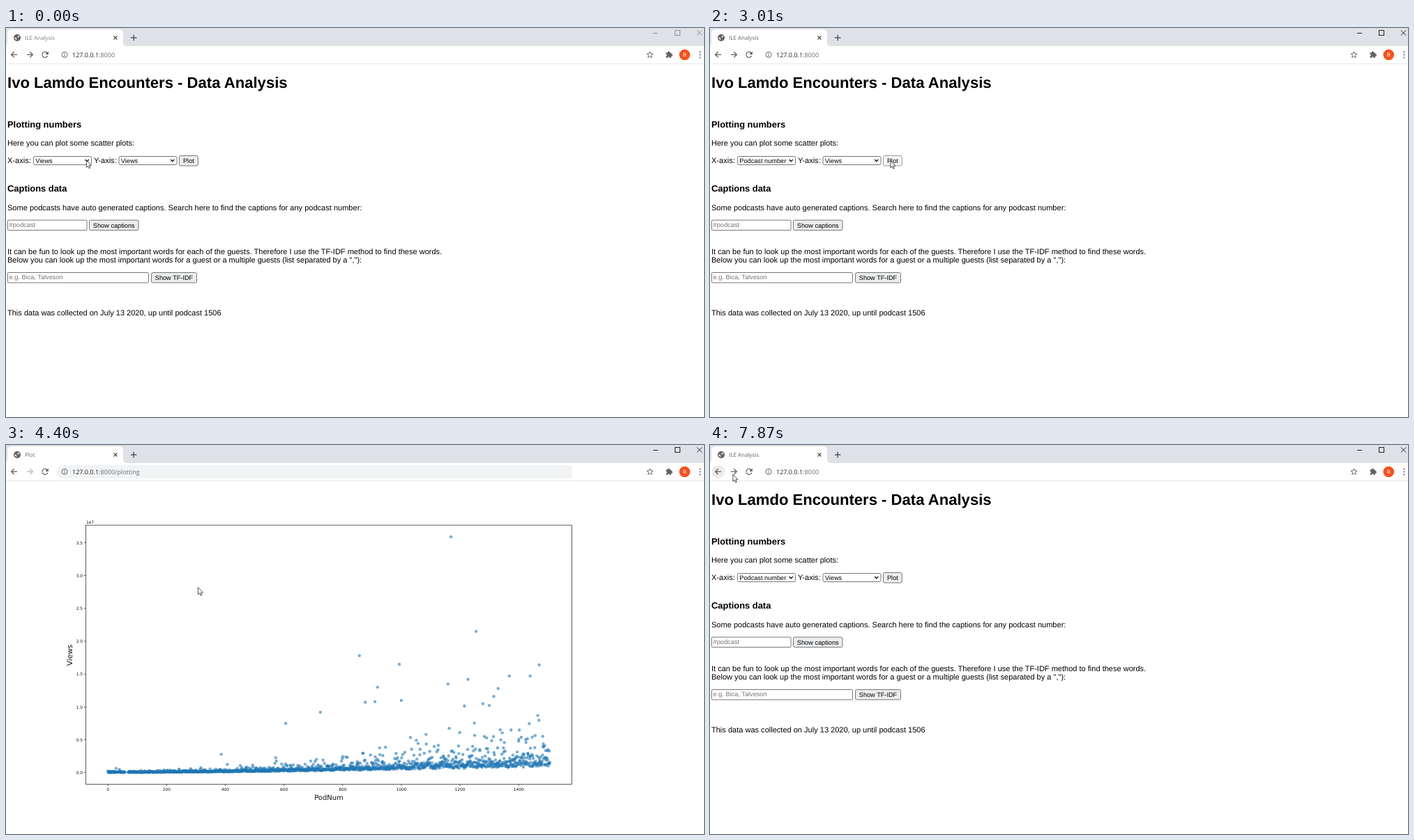
An HTML page with a canvas for the animation above (7.99 s loop, 1001 px wide and 559 px high).

```html
<!DOCTYPE html>
<html lang="en">
<head>
<meta charset="utf-8">
<title>Data Analysis</title>
<style>
html, body { margin: 0; width: 100%; height: 100%; overflow: hidden; background: #fff; }
canvas { display: block; }
</style>
</head>
<body>
<canvas id="stage" width="1001" height="559"></canvas>
<script>
const LOOP = 7990;
const STEP = 130;
const ctx = document.getElementById('stage').getContext('2d');
const ARIAL = '"Liberation Sans", Arial, sans-serif';
const UI = '"Open Sans", "Noto Sans", sans-serif';
const PLOT = '"DejaVu Sans", sans-serif';
const GREY = '#5f6368';
const OPTIONS = ['Views', 'Rating', 'Duration', 'Podcast number'];

// Moments at which the interface changes
const T = {
  open: 270, pick: 2170, close: 2320, hover: 2860, press: 3010, load: 3130,
  status: 3430, plot: 3550, fade: 3700, statusEnd: 3970,
  back: 5690, tip: 6270, reload: 7140, home: 7300
};

// Pointer moves: start time, number of steps, destination
const REST = { x: 115, y: 190 };
const MOVES = [
  [950, 5, 66, 237], [2470, 4, 258.5, 190.5], [4400, 1, 275, 204.5],
  [4520, 2, 300, 276], [4760, 1, 254, 269], [4910, 2, 96, 168],
  [5180, 3, 12, 59], [5570, 2, 12, 41], [7870, 1, 32.5, 42]
];

// The most viewed episodes: number, views in units of 1e7
const HITS = [
  [1169, 3.59], [1255, 2.15], [857, 1.78], [993, 1.65], [1470, 1.64], [1368, 1.47],
  [1439, 1.47], [1227, 1.42], [1159, 1.35], [1330, 1.28], [919, 1.3], [1315, 1.16],
  [1000, 1.1], [910, 1.08], [877, 1.07], [1278, 1.05], [724, 0.92], [606, 0.75]
];

function text(g, str, x, y, size, family, color = '#000', weight = '', align = 'left') {
  g.font = `${weight} ${size}px ${family}`;
  g.textRendering = 'geometricPrecision';
  g.textAlign = align;
  g.fillStyle = color;
  g.fillText(str, x, y);
}

function rect(x, y, w, h, color) {
  ctx.fillStyle = color;
  ctx.fillRect(x, y, w, h);
}

function line(color, width, ...pts) {
  ctx.strokeStyle = color;
  ctx.lineWidth = width;
  ctx.beginPath();
  for (let i = 0; i < pts.length; i += 2) ctx.lineTo(pts[i], pts[i + 1]);
  ctx.stroke();
}

function disc(g, x, y, r, color) {
  g.fillStyle = color;
  g.beginPath();
  g.arc(x, y, r, 0, 7);
  g.fill();
}

function arc(x, y, r, from, to, color, width) {
  ctx.strokeStyle = color;
  ctx.lineWidth = width;
  ctx.beginPath();
  ctx.arc(x, y, r, from, to);
  ctx.stroke();
}

function box(x, y, w, h, fill, stroke, radius = 2, width = 1) {
  ctx.beginPath();
  ctx.roundRect(x + 0.5, y + 0.5, w - 1, h - 1, radius);
  ctx.fillStyle = fill;
  ctx.fill();
  ctx.strokeStyle = stroke;
  ctx.lineWidth = width;
  ctx.stroke();
}

function cross(x, y, r, color, width) {
  line(color, width, x - r, y - r, x + r, y + r);
  line(color, width, x - r, y + r, x + r, y - r);
}

function arrow(x, y, dir, color) {
  line(color, 1.3, x - 4 * dir, y, x + 4.5 * dir, y);
  line(color, 1.3, x + 0.3 * dir, y - 4, x + 4.3 * dir, y, x + 0.3 * dir, y + 4);
}

function globe(x, y) {
  disc(ctx, x, y, 5, GREY);
  ctx.fillStyle = '#fff';
  ctx.beginPath();
  ctx.ellipse(x - 2, y + 1.2, 0.9, 2, -0.7, 0, 7);
  ctx.ellipse(x + 1.7, y - 1.6, 1.6, 0.9, -0.5, 0, 7);
  ctx.fill();
}

function star(x, y) {
  const pts = [];
  for (let i = 0; i <= 10; i++) {
    const a = i * Math.PI / 5 - Math.PI / 2, r = i % 2 ? 2.1 : 4.7;
    pts.push(x + r * Math.cos(a), y + r * Math.sin(a));
  }
  line(GREY, 1, ...pts);
}

function puzzle(x, y) {
  rect(x - 4.5, y - 2.8, 7.6, 7.3, GREY);
  disc(ctx, x - 0.7, y - 3.2, 1.7, GREY);
  disc(ctx, x + 3.3, y + 0.6, 1.7, GREY);
  disc(ctx, x - 4.5, y + 1, 1.4, '#fff');
  disc(ctx, x - 0.7, y + 4.6, 1.4, '#fff');
}

const within = (t, from, to) => t >= from && t < to;
const isLoading = t => within(t, T.load, T.plot) || within(t, T.reload, T.home);

function tabStrip(t) {
  const active = t >= T.open;
  rect(0, 0, 1001, 26, '#dee1e6');
  ctx.fillStyle = '#fff';
  ctx.beginPath();
  ctx.moveTo(-4, 26);
  ctx.quadraticCurveTo(2, 26, 2, 20);
  ctx.lineTo(2, 8);
  ctx.quadraticCurveTo(2, 2, 8, 2);
  ctx.lineTo(162, 2);
  ctx.quadraticCurveTo(168, 2, 168, 8);
  ctx.lineTo(168, 20);
  ctx.quadraticCurveTo(168, 26, 174, 26);
  ctx.fill();
  if (isLoading(t)) {
    const age = t - (t < T.plot ? T.load : T.reload);
    arc(16, 14, 4.3, -Math.PI / 2, -Math.PI / 2 + 0.25 + age / 90, '#8f9398', 1.2);
  } else globe(16, 14);
  const title = within(t, T.plot, T.reload) ? 'Plot' : 'ILE Analysis';
  text(ctx, title, 27, 17, 8, UI, active ? GREY : '#7d8185');
  cross(157, 14, 2.5, '#45484c', 1.1);
  line('#45484c', 1.3, 179, 14, 187.5, 14);
  line('#45484c', 1.3, 183.2, 9.8, 183.2, 18.2);

  const color = active ? '#222' : '#8f9194';
  line(color, 1, 928, 7.5, 935, 7.5);
  ctx.strokeRect(959.5, 3.5, 7, 7);
  cross(994.5, 7, 3.5, color, 1);
}

function toolbar(t) {
  const plotUrl = within(t, T.plot, T.reload);
  rect(0, 26, 1001, 25, '#fff');
  rect(0, 51, 1001, 1, '#e6e7e9');
  if (t >= T.back) disc(ctx, 12, 38.3, 9.6, within(t, T.reload, T.home) ? '#e0e1e3' : '#ebecee');
  arrow(12, 38.3, -1, GREY);
  arrow(34, 38.3, 1, plotUrl ? '#b9bbbe' : GREY);
  if (isLoading(t)) cross(56, 38.3, 3.7, GREY, 1.3);
  else {
    arc(56, 38.3, 4, 0.35, 5.6, GREY, 1.3);
    ctx.fillStyle = GREY;
    ctx.beginPath();
    ctx.moveTo(60.8, 33.4);
    ctx.lineTo(60.8, 37.9);
    ctx.lineTo(56.3, 37.9);
    ctx.fill();
  }
  if (within(t, T.plot, T.home)) {
    ctx.fillStyle = '#f1f3f4';
    ctx.beginPath();
    ctx.roundRect(72, 29, 740, 19, [9.5, 0, 0, 9.5]);
    ctx.fill();
  }
  arc(84, 38.3, 4, 0, 7, GREY, 1);
  rect(83.5, 37.6, 1, 3, GREY);
  rect(83.5, 35.8, 1, 1, GREY);
  text(ctx, '127.0.0.1', 95, 41.7, 9, UI, '#202124');
  const host = ctx.measureText('127.0.0.1').width;
  text(ctx, plotUrl ? ':8000/plotting' : ':8000', 95 + host, 41.7, 9, UI, '#6b6f74');
  star(923.5, 38.6);
  puzzle(951, 38.3);
  disc(ctx, 973.3, 38.5, 7.8, '#f4511e');
  text(ctx, 'B', 973.3, 41.2, 7.5, UI, '#fff', '', 'center');
  for (let i = -1; i <= 1; i++) disc(ctx, 995.5, 38.5 + 4 * i, 1.1, GREY);
}

function select(x, label, focus) {
  box(x, 184, 84, 13, '#fff', focus ? '#101010' : '#767676', 2, focus ? 1.8 : 1);
  text(ctx, label, x + 3.3, 193.6, 9.2, ARIAL);
  line('#111', 1.3, x + 74.6, 189, x + 77.2, 191.7, x + 79.8, 189);
}

function button(x, y, w, label, fill = '#ebedef', stroke = '#767676') {
  box(x, y, w, 15.5, fill, stroke);
  text(ctx, label, x + w / 2, y + 10.9, 9.2, ARIAL, '#000', '', 'center');
}

function field(y, w, hint) {
  box(2, y, w, 15.5, '#fff', '#767676', 1);
  text(ctx, hint, 4.6, y + 10.4, 9.2, ARIAL, '#757575');
}

function dropdown(row) {
  ctx.save();
  ctx.shadowColor = 'rgba(0,0,0,.45)';
  ctx.shadowBlur = 4;
  ctx.shadowOffsetY = 1;
  rect(40, 197, 83.5, 49, '#fff');
  ctx.restore();
  ctx.strokeStyle = '#8a8a8a';
  ctx.lineWidth = 0.8;
  ctx.strokeRect(39.9, 196.9, 83.5, 49);
  OPTIONS.forEach((name, i) => {
    if (i === row) rect(40.3, 197 + i * 12, 82.7, 12.4, '#1e90ff');
    text(ctx, name, 43, 205.8 + i * 12, 9.2, ARIAL, i === row ? '#fff' : '#000');
  });
}

function home(t, py) {
  const copy = (str, y, x = 2) => text(ctx, str, x, y, 11.04, ARIAL);
  const head = (str, y, size = 12.92) => text(ctx, str, 2, y, size, ARIAL, '#000', 'bold');
  head('Ivo Lamdo Encounters - Data Analysis', 86, 22.08);
  head('Plotting numbers', 143);
  copy('Here you can plot some scatter plots:', 169);
  copy('X-axis:', 193.6);
  select(39, OPTIONS[t < T.pick ? 0 : 3], within(t, T.open, T.press));
  copy('Y-axis:', 193.6, 126);
  select(161.5, OPTIONS[0], false);
  if (within(t, T.press, T.load)) button(248, 183, 27.8, 'Plot', '#f6f6f6', '#9a9a9a');
  else button(248, 183, 27.8, 'Plot', within(t, T.hover, T.plot) ? '#e3e4e6' : undefined);
  head('Captions data', 235.3);
  copy('Some podcasts have auto generated captions. Search here to find the captions for any podcast number:', 262);
  field(275.6, 114.5, '#podcast');
  button(119, 275.6, 71.5, 'Show captions');
  copy('It can be fun to look up the most important words for each of the guests. Therefore I use the TF-IDF method to find these words.', 324.6);
  copy('Below you can look up the most important words for a guest or a multiple guests (list separated by a ","):', 337.3);
  field(351, 203, 'e.g. Bica, Talveson');
  button(208, 351, 66, 'Show TF-IDF');
  copy('This data was collected on July 13 2020, up until podcast 1506', 412.8);
  if (within(t, T.open, T.close)) {
    dropdown(Math.max(0, Math.min(3, Math.floor((py - 197) / 12))));
  }
}

function makeChart() {
  const c = document.createElement('canvas');
  c.width = 1001;
  c.height = 559;
  const g = c.getContext('2d');
  const xOf = n => 146.2 + n * 0.42075;
  const yOf = v => 470.8 - v * 94.4;
  const label = (str, x, y, size, align) => text(g, str, x, y, size, PLOT, '#111', '', align);

  g.fillStyle = g.strokeStyle = '#333';
  g.lineWidth = 0.8;
  g.strokeRect(114.5, 115.2, 697, 372.3);
  for (let i = 0; i < 8; i++) {
    const x = xOf(i * 200), y = yOf(i / 2);
    g.fillStyle = '#333';
    g.fillRect(x - 0.4, 487.5, 0.8, 2.6);
    g.fillRect(112, y - 0.4, 2.6, 0.8);
    label(String(i * 200), x, 497.2, 5.9, 'center');
    label((i / 2).toFixed(1), 110, y + 2.2, 5.9, 'right');
  }
  label('1e7', 115, 112.8, 5.9);
  label('PodNum', 463, 510, 10, 'center');
  g.save();
  g.translate(95.3, 302);
  g.rotate(-Math.PI / 2);
  label('Views', 0, 0, 10.6, 'center');
  g.restore();

  // Log-normal views whose floor and spread grow with the episode number
  let seed = 20200713;
  const rnd = () => (seed = (seed * 16807) % 2147483647) / 2147483647;
  const gauss = () => Math.sqrt(-2 * Math.log(rnd())) * Math.cos(2 * Math.PI * rnd());
  const dot = (x, y) => disc(g, x, y, 2.2, 'rgba(31,119,180,.6)');
  for (let n = 0; n <= 1506; n++) {
    if (n > 58 && n < 69) continue;
    const u = n / 1506;
    const rise = (0.45 + 10 * u ** 2.2) * Math.exp(0.95 * gauss());
    dot(xOf(n), 470.6 - 8 * u ** 1.7 - Math.min(rise, 90));
  }
  for (const [n, v] of HITS) dot(xOf(n), yOf(v));
  return c;
}

function statusBar(alpha) {
  ctx.globalAlpha = alpha;
  ctx.fillStyle = '#dee1e6';
  ctx.beginPath();
  ctx.roundRect(0, 544.5, 333.5, 15, [0, 3, 0, 0]);
  ctx.fill();
  text(ctx, 'Waiting for 127.0.0.1...', 0, 555, 7.8, UI, GREY);
  ctx.globalAlpha = 1;
}

function tooltip() {
  box(19, 51, 142, 18, '#fff', '#c4c4c4', 0);
  text(ctx, 'Click to go back, hold to see history', 24, 63, 8, UI, '#575757');
}

function pointerAt(t) {
  let { x, y } = REST;
  for (const [start, steps, toX, toY] of MOVES) {
    if (t < start) break;
    const p = Math.min(1, (Math.floor((t - start) / STEP) + 1) / steps);
    const ease = 1 - (1 - p) ** 2;
    x += (toX - x) * ease;
    y += (toY - y) * ease;
  }
  return { x, y };
}

function pointer(x, y) {
  const shape = new Path2D('M0 0V10.2L2.3 8.1L3.9 11.6L5.5 10.9L4 7.5L7.1 7.3Z');
  ctx.save();
  ctx.translate(x + 0.4, y + 0.2);
  ctx.fillStyle = '#fff';
  ctx.fill(shape);
  ctx.strokeStyle = '#222';
  ctx.lineWidth = 0.8;
  ctx.stroke(shape);
  ctx.restore();
}

const chart = makeChart();

function draw(t) {
  const { x, y } = pointerAt(t);
  rect(0, 0, 1001, 559, '#fff');
  tabStrip(t);
  toolbar(t);
  if (within(t, T.plot, T.home)) ctx.drawImage(chart, 0, 0);
  else home(t, y);
  if (within(t, T.status, T.statusEnd)) {
    const faded = t < T.fade ? 0 : Math.floor((t - T.fade) / STEP) + 1;
    statusBar(1 - faded / 3);
  }
  if (within(t, T.tip, T.reload)) tooltip();
  pointer(x, y);
}

const start = performance.now();
function tick() {
  draw((performance.now() - start) % LOOP);
  requestAnimationFrame(tick);
}
tick();
</script>
</body>
</html>
```
